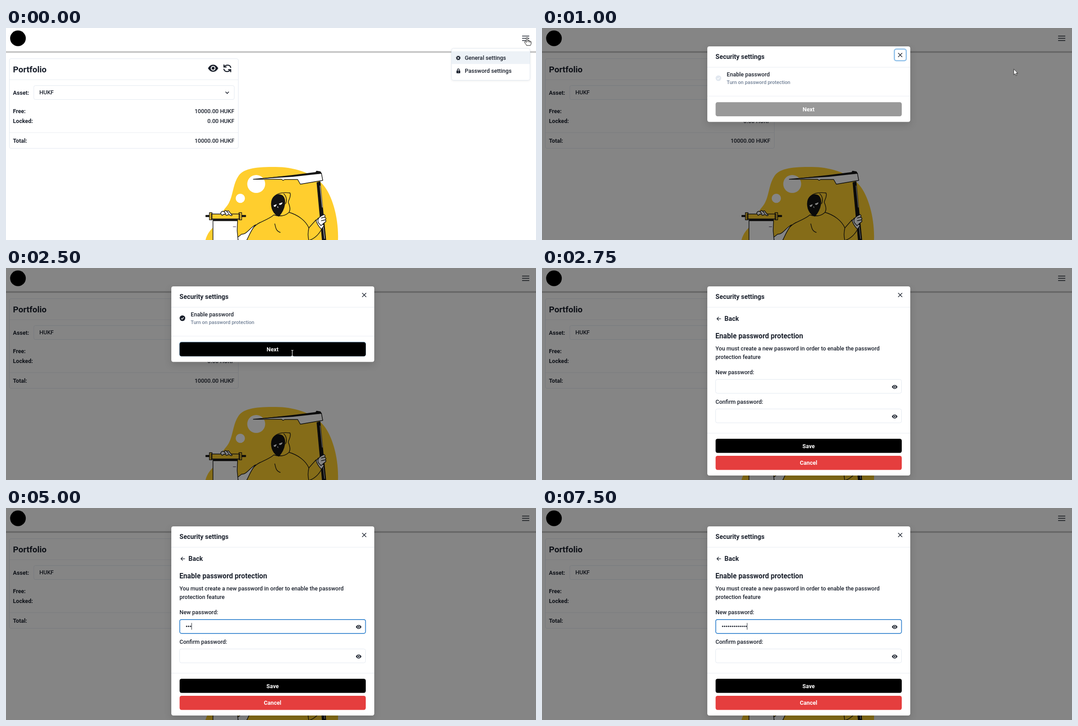
An HTML page for the animation above (8000 ms loop, 1183 by 473 pixels).

```html
<!DOCTYPE html>
<html lang="en">
<head>
<meta charset="utf-8">
<title>Security settings</title>
<style>
html, body { margin: 0; width: 100%; height: 100%; overflow: hidden; background: #fff; }
svg { display: block; }
text { font: 500 12.6px Roboto, Arial, sans-serif; fill: #1a202c; }
.b { font-weight: 600; }
.mid { font-size: 14.4px; font-weight: 600; }
.btn { font-weight: 700; fill: #fff; text-anchor: middle; }
.end { text-anchor: end; }
.line { fill: none; stroke: #1a202c; stroke-width: 1.6; }
.box { fill: #fff; stroke: #e2e8f0; }
.rule { stroke: #e9edf2; }
.dialog { filter: drop-shadow(0 6px 8px rgba(0, 0, 0, .14)); }
.art { stroke: #141414; stroke-width: 1.4; stroke-linejoin: round; stroke-linecap: round; }
.art .plain { stroke: none; }
.ink { fill: #141414; }
.pen { fill: none; }

/* Everything moves in hard 250 ms steps; 3.125% is one step. */
.a { animation: 8s step-end infinite; }
.menu { animation-name: menu; }
.general { animation-name: general; }
.password { animation-name: password; }
.overlay { animation-name: overlay; }
.choose { animation-name: choose; }
.form { animation-name: form; }
.ring { animation-name: ring; }
.tick { animation-name: tick; }
.next { animation-name: next; }
.pressed { animation-name: pressed; }
.focus { animation-name: focus; }
.caret { animation-name: type; }
.hand { animation-name: hand; }
.arrow { animation-name: arrow; }
.beam { animation-name: beam; mix-blend-mode: difference; }

@keyframes menu { 0% { visibility: visible } 12.5%, 100% { visibility: hidden } }
@keyframes general { 0% { fill: #edf2f7 } 6.25%, 100% { fill: #fff } }
@keyframes password { 0% { fill: #fff } 6.25% { fill: #edf2f7 } 9.375%, 100% { fill: #e2e8f0 } }
@keyframes overlay { 0% { visibility: hidden } 12.5%, 100% { visibility: visible } }
@keyframes choose { 0% { visibility: hidden } 12.5% { visibility: visible } 34.375%, 100% { visibility: hidden } }
@keyframes form { 0% { visibility: hidden } 34.375%, 100% { visibility: visible } }
@keyframes ring { 0% { visibility: hidden } 12.5% { visibility: visible } 21.875%, 100% { visibility: hidden } }
@keyframes tick { 0% { fill: #e2e8f0 } 21.875%, 100% { fill: #1a202c } }
@keyframes next { 0% { fill: #999 } 21.875%, 100% { fill: #000 } }
@keyframes pressed { 0% { visibility: hidden } 31.25% { visibility: visible } 34.375%, 100% { visibility: hidden } }
@keyframes focus { 0% { visibility: hidden } 43.75%, 100% { visibility: visible } }
@keyframes type {
  0% { transform: none }
  53.125% { transform: translateX(4.36px) }
  56.25% { transform: translateX(calc(4.36px * 2)) }
  62.5% { transform: translateX(calc(4.36px * 3)) }
  65.625% { transform: translateX(calc(4.36px * 4)) }
  71.875% { transform: translateX(calc(4.36px * 5)) }
  75% { transform: translateX(calc(4.36px * 6)) }
  78.125% { transform: translateX(calc(4.36px * 7)) }
  81.25% { transform: translateX(calc(4.36px * 8)) }
  84.375% { transform: translateX(calc(4.36px * 9)) }
  87.5% { transform: translateX(calc(4.36px * 10)) }
  90.625% { transform: translateX(calc(4.36px * 12)) }
  93.75%, 100% { transform: translateX(calc(4.36px * 13)) }
}
@keyframes hand {
  0% { visibility: visible; transform: translate(1163px, 21px) }
  3.125% { visibility: visible; transform: translate(1120px, 62px) }
  6.25% { visibility: visible; transform: translate(1057px, 91px) }
  12.5% { visibility: hidden; transform: translate(395px, 110px) }
  18.75% { visibility: visible; transform: translate(395px, 110px) }
  25%, 100% { visibility: hidden; transform: translate(395px, 110px) }
}
@keyframes arrow {
  0% { visibility: hidden; transform: translate(1053px, 91.5px) }
  12.5% { visibility: visible; transform: translate(1053px, 91.5px) }
  15.625% { visibility: visible; transform: translate(620px, 112px) }
  18.75% { visibility: hidden; transform: translate(520px, 146px) }
  25% { visibility: visible; transform: translate(520px, 146px) }
  28.125%, 100% { visibility: hidden; transform: translate(520px, 146px) }
}
@keyframes beam {
  0% { visibility: hidden; transform: translate(639px, 190px) }
  28.125% { visibility: visible; transform: translate(639px, 190px) }
  34.375% { visibility: hidden; transform: translate(639px, 190px) }
  37.5% { visibility: visible; transform: translate(606px, 236px) }
  40.625% { visibility: visible; transform: translate(577px, 268px) }
  46.875%, 100% { visibility: hidden; transform: translate(577px, 268px) }
}
</style>
</head>
<body>
<svg width="1183" height="473" viewBox="0 0 1183 473">
  <defs>
    <linearGradient id="edge" x2="0" y2="1">
      <stop stop-color="#fff"/><stop offset=".4" stop-color="#b9b9b9"/>
      <stop offset=".65" stop-color="#bdbdbd"/><stop offset="1" stop-color="#fff"/>
    </linearGradient>
    <g id="eye">
      <path d="M-11.5 0Q-7-8 0-8T11.5 0Q7 8 0 8T-11.5 0Z" fill="#1a202c"/>
      <circle r="5.3" fill="#fff"/><circle r="3.2" fill="#1a202c"/>
    </g>
    <path id="turn" d="M-7.5-8.5V-2.8H-1.6M-7-3.2C-3-9 7-8.5 7.7-1" fill="none" stroke="#1a202c" stroke-width="2.3"/>
  </defs>
  <rect width="1183" height="473" fill="#fff"/>

  <!-- header -->
  <rect y="51" width="1183" height="5" fill="url(#edge)"/>
  <circle cx="26.7" cy="23" r="17.5" fill="#000"/>
  <path class="line" d="M1152 18h16M1152 23h16M1152 28h16"/>

  <!-- portfolio card -->
  <rect class="box" x="7.5" y="68.5" width="511" height="200" rx="3.5"/>
  <path class="rule" d="M8 115.500H518M8 233.500H518"/>
  <text class="b" x="15.5" y="98.5" style="font-size:19px">Portfolio</text>
  <use href="#eye" x="462.3" y="89.7"/>
  <g transform="translate(494 90)"><use href="#turn"/><use href="#turn" transform="rotate(180)"/></g>
  <text class="b" x="15.5" y="148.5">Asset:</text>
  <rect class="box" x="62" y="128.5" width="447.5" height="31" rx="3.5"/>
  <text x="74.5" y="148">HUKF</text>
  <path class="line" d="M490 142.300l3.700 3.700 3.700-3.700"/>
  <text class="b" x="15.5" y="189.5">Free:</text>
  <text class="end" x="509.7" y="189.5">10000.00 HUKF</text>
  <text class="b" x="15.5" y="212">Locked:</text>
  <text class="end" x="509.7" y="212">0.00 HUKF</text>
  <text class="b" x="15.5" y="255.5">Total:</text>
  <text class="end" x="509.7" y="255.5">10000.00 HUKF</text>

  <!-- illustration -->
  <g class="art" fill="#ffce2e">
    <path class="plain" d="M445 474C449 458 458 448 468 440C478 425 480 412 490 401C508 382 504 352 519 330C531 312 562 310 602 310C640 310 684 322 708 350C730 376 743 428 741 474Z"/>
    <g class="plain" fill="#fff"><circle cx="558.5" cy="348" r="20"/><circle cx="523" cy="380" r="10.3"/></g>
    <!-- scythe -->
    <path class="ink" d="M694 345L701 343L714 474H706Z"/>
    <path d="M701 352L706 400M707 432L711 470" stroke="#fff" stroke-width="1"/>
    <path fill="#fff" d="M552 337.5L692 325L704 324L707 340L657 348.500L651 338L622 338L618.500 340L615 337.500Z"/>
    <path class="plain ink" d="M552 337.5L640 328L691 321.500L693 318.500L702 320L705 325L690 326.500L640 332Z"/>
    <!-- robe -->
    <path d="M535 474C541 458 551 442 567 434C580 428 590 424 598 417C612 422 624 418 631 411C652 417 669 430 676 446L692 428L706 446C699 460 689 470 676 474Z"/>
    <path fill="#fff" d="M517 467L526 460C537 461 544 446 557 439C546 452 542 465 537 474H518Z"/>
    <path fill="#fff" d="M692 430L697 424L710 441L704 449C699 444 695 438 692 430Z"/>
    <path class="pen" d="M600 437C602 446 603 453 612 456M676 446C674 455 673 463 676 474"/>
    <!-- hood -->
    <path d="M596 380C602 369 616 366 634 368C637 376 631 382 630 389C634 398 635 407 631 412C622 420 610 421 602 416Z"/>
    <path class="ink" d="M593 386C596 372 610 369 617 374C626 382 624 403 609 420C598 416 590 402 593 386Z"/>
    <path class="plain" fill="#fff" d="M597 396L604 393Q603 399 599 399ZM609 392L617 389Q617 394 611 395ZM605 399l2-1 1 4z"/>
    <path class="pen" d="M620 370C627 376 627 386 624 392"/>
    <!-- gripping hand -->
    <path fill="#fff" d="M697 434C694 425 701 421 706 418L710 416Q714 419 711 422Q716 424 713 428Q716 432 711 434L703 441Z"/>
    <path class="pen" d="M704 424L711 422M704 430L713 428"/>
    <!-- scroll -->
    <path fill="#fff" d="M462 425H517L516 452L518 474H462Z"/>
    <path class="ink" d="M463 427H516V430H463ZM446 418H535V421H446Z"/>
    <path d="M458 415H522V426H458ZM454 412H460V428H454ZM520 412H526V428H520Z"/>
    <path fill="#fff" d="M479 413Q482 407 487 410Q489 405 493 409Q497 406 499 411L505 418Q502 420 498 416L492 418L488 415L482 418Z"/>
    <path class="pen" d="M487 410L491 415M493 409L497 414"/>
    <path stroke="#3c2c55" stroke-width="1" d="M507 443.500H513"/>
  </g>

  <!-- dropdown menu -->
  <g class="menu a">
    <rect class="box" x="994.5" y="45.5" width="175" height="71" rx="4" style="filter:drop-shadow(0 1px 2px rgba(0,0,0,.08))"/>
    <rect class="general a" x="995" y="52" width="174" height="28.5"/>
    <rect class="password a" x="995" y="80.5" width="174" height="28.5"/>
    <g fill="none" stroke="#1a202c">
      <circle cx="1009.5" cy="66.8" r="2.9" stroke-width="2"/>
      <circle cx="1009.5" cy="66.8" r="4.3" stroke-width="1.7" stroke-dasharray="1.8 1.577"/>
      <path d="M1007.500 95.500V93.500a2.200 2.200 0 0 1 4.400 0V95.500" stroke-width="1.4"/>
    </g>
    <rect x="1005.5" y="95" width="8.4" height="6" rx="1" fill="#1a202c"/>
    <path d="M1009.700 97v2" stroke="#fff"/>
    <text x="1024" y="70.5">General settings</text>
    <text x="1024" y="99.5">Password settings</text>
  </g>

  <rect class="overlay a" width="1183" height="473" fill="#000" fill-opacity=".48"/>

  <!-- first dialog page -->
  <g class="choose a">
    <rect class="dialog" x="369" y="41" width="453" height="168.5" rx="4.5" fill="#fff"/>
    <path class="rule" d="M369 152H822"/>
    <circle class="tick a" cx="393.8" cy="112" r="6.3"/>
    <path d="M391 112.300l2 2 3.600-4" fill="none" stroke="#fff" stroke-width="1.3"/>
    <text x="412.3" y="108.3">Enable password</text>
    <text x="412.3" y="125.3" style="font-size:11.05px;fill:#718096">Turn on password protection</text>
    <rect class="pressed a" x="386.5" y="164.5" width="417" height="33" rx="5" fill="#a5cdee"/>
    <rect class="next a" x="387.5" y="165.5" width="415.5" height="31.5" rx="4.5"/>
    <text class="btn" x="595" y="185.6">Next</text>
  </g>

  <!-- second dialog page -->
  <g class="form a">
    <rect class="dialog" x="369" y="41" width="453" height="422" rx="4.5" fill="#fff"/>
    <path class="rule" d="M369 368.500H822"/>
    <path class="line" style="stroke-width:1.3" d="M399.500 113.300H390.500M394.500 109.300l-4 4 4 4"/>
    <text class="mid" x="407.3" y="118.3">Back</text>
    <text class="b" x="387" y="157.3" style="font-size:15.7px">Enable password protection</text>
    <text x="387.2" y="183.7">You must create a new password in order to enable the password</text>
    <text x="387.2" y="202.5">protection feature</text>
    <text x="387.2" y="237">New password:</text>
    <rect class="box" x="387.5" y="248.5" width="415" height="31" rx="4"/>
    <text x="387.2" y="303.3">Confirm password:</text>
    <rect class="box" x="387.5" y="314.5" width="415" height="31" rx="4"/>
    <rect x="387.5" y="381" width="415.5" height="31.5" rx="4.5"/>
    <text class="btn" x="595" y="401.5">Save</text>
    <rect x="387.5" y="419" width="415.5" height="31.5" rx="4.5" fill="#e53e3e"/>
    <text class="btn" x="595" y="439">Cancel</text>
  </g>
  <g class="focus a">
    <rect x="387.8" y="248.8" width="414.7" height="31" rx="4" fill="#fff" stroke="#3182ce" stroke-width="1.7"/>
    <path d="M403.200 264h52.400" stroke="#1a202c" stroke-width="3.2" stroke-linecap="round" stroke-dasharray="0 4.36"/>
    <g class="caret a">
      <rect x="401" y="256" width="62" height="16" fill="#fff"/>
      <path d="M401.200 256.500V271.500" stroke="#1a202c"/>
    </g>
  </g>
  <g class="form a">
    <use href="#eye" transform="translate(787.2 265.3) scale(.55)"/>
    <use href="#eye" transform="translate(787.2 331.3) scale(.55)"/>
  </g>

  <!-- dialog header -->
  <g class="overlay a">
    <path class="rule" d="M369 87.500H822"/>
    <text class="mid" x="387.3" y="68.5">Security settings</text>
    <path class="line" style="stroke-width:1.4" d="M795 55.700l9 9M804 55.700l-9 9"/>
  </g>
  <rect class="ring a" x="786.5" y="47" width="26.5" height="26" rx="4.5" fill="none" stroke="#8ec0ea" stroke-width="2.6"/>

  <!-- pointers -->
  <path class="hand a" fill="#fff" stroke="#111" d="M-1.500 1.500Q-1.500 0 0 0T1.500 1.500V7Q4.500 6.200 4.500 7.800Q7 7.200 7 8.800Q9.200 8.400 9.200 10.200V13Q9.200 15.500 7.400 18H-1Q-2 15.500-5 12Q-6.600 9.800-5 9.200Q-3.600 8.800-1.500 11.200ZM1.500 7V10.500M4.500 8V11M7 9V11.500"/>
  <path class="arrow a" fill="#fff" stroke="#222" d="M0 0V13L3 10.300L5 14.700L7 13.800L5 9.500H9Z"/>
  <path class="beam a" fill="none" stroke="#fff" stroke-width="1.2" d="M-2.500-6.500H-.8L0-5.800L.8-6.500H2.500M0-5.800V5.800M-2.500 6.500H-.8L0 5.800L.8 6.500H2.500"/>
</svg>
</body>
</html>
```
